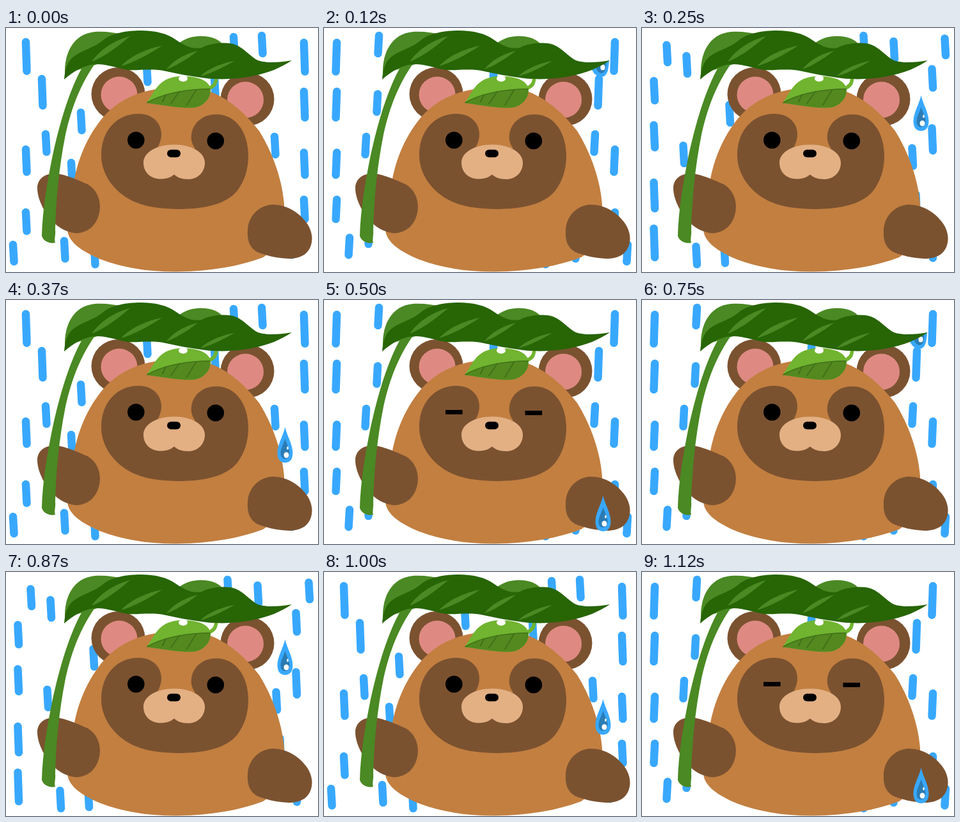
These frames come from a looping animation (488x384 px, 1.25 s). An HTML page with a canvas:

```html
<!DOCTYPE html>
<html lang="en">
<head>
<meta charset="utf-8">
<title>Tanuki in the rain</title>
<style>
html, body { margin: 0; width: 100%; height: 100%; overflow: hidden; background: #fff; }
canvas { display: block; }
</style>
</head>
<body>
<canvas id="stage" width="488" height="384"></canvas>
<script>
const ctx = document.getElementById('stage').getContext('2d');

const W = 486, H = 384, LOOP = 1250;

const BLUE = '#38a8ff', DEEP = '#2b7cb3', FUR = '#c27f40', DARK = '#7b5230',
  PINK = '#de8a82', CREAM = '#e3b084', STEM = '#4a8923', LEAF = '#276505',
  LIME = '#70b42f', MOSS = '#53891f', VEIN = '#41711a';

// Rain columns: x, then the top of each streak
const COLUMNS = [
  [11, 341], [31, 22, 191, 290], [56, 80], [62, 167], [91, 335], [102, 212],
  [117, 133], [138, 344], [220, 57], [326, 78], [348, 235], [356, 14], [400, 12],
  [402, 104], [415, 312], [420, 171], [446, 330], [466, 23, 100, 196, 270]
];

function fill(d, color) {
  ctx.fillStyle = color;
  ctx.fill(new Path2D(d));
}

function oval(x, y, rx, ry, color) {
  ctx.fillStyle = color;
  ctx.beginPath();
  ctx.ellipse(x, y, rx, ry, 0, 0, Math.PI * 2);
  ctx.fill();
}

function line(d, color, width) {
  ctx.strokeStyle = color;
  ctx.lineWidth = width;
  ctx.lineCap = 'round';
  ctx.stroke(new Path2D(d));
}

// One pattern serves all three phases: as is, mirrored, turned upside down
function rain(phase) {
  ctx.save();
  if (phase === 1) ctx.transform(-1, 0, 0, 1, W, 0);
  if (phase === 2) ctx.transform(-1, 0, 0, -1, W, H);
  for (const [x, ...tops] of COLUMNS) {
    for (const y of tops) {
      const edge = x < 60 || x > 440;
      const len = edge ? 47 - y * 0.06 : 28;
      line(`M${x} ${y}l1.5 ${len}`, BLUE, 12.5);
    }
  }
  ctx.restore();
}

function ear(x, y, px, py) {
  oval(x, y, 42, 42, DARK);
  oval(px, py, 28.5, 28.5, PINK);
}

function body() {
  ear(175.5, 104, 177, 105);
  ear(377.5, 112, 374.5, 113);
  fill('M268 94C220 94 182 107 153 139C126 171 112 208 106 243C103 270 98 300 96 318' +
    'C98 338 120 352 148 364C185 378 225 384 268 383.5C320 383 365 375 402 361' +
    'C424 348 436 310 435 277C432 238 417 196 396 162C374 134 348 110 314 98C299 95 284 94 268 94Z', FUR);
}

function eye(x, y, shut) {
  if (shut) {
    ctx.fillStyle = '#000';
    ctx.fillRect(x - 13.3, y - 3.5, 26.6, 7);
  } else {
    oval(x, y, 13.3, 13.3, '#000');
  }
}

function face(shut) {
  fill('M207 135C230 135 243 150 243 167C243 176 240 183 236 190L296 190' +
    'C291 183 289 176 290 168C292 149 308 136 329 136C361 136 379 166 379 201' +
    'C379 224 372 243 361 257C344 277 312 285 268 285C225 284 200 277 179 260' +
    'C158 242 149 220 149 200C149 162 173 135 207 135Z', DARK);
  fill('M263 183.5C291 183.5 311 196 311 212C311 228 299 238 285 238C275 238 267 235 263 230.5' +
    'C258 235 251 237.5 242 237.5C226 237.5 215 227 215 212C215 196 235 183.5 263 183.5Z', CREAM);
  line('M258 197.5h9', '#000', 12);
  eye(203.3, 176.5, shut);
  eye(327.8, 177.7, shut);
}

function hat() {
  line('M316 95C324 93 328 88 328.5 81', LIME, 5.5);
  fill('M220 118C229 105 234 91 249 82C262 75 280 74 297 78C311 81 318 87 320 96' +
    'C320 109 313 119 300 124C284 128 263 124 220 118Z', LIME);
  fill('M220 118C242 104 280 96 320 96C320 109 313 119 300 124C284 128 263 124 220 118Z', MOSS);
  line('M221 117.5C243 104 280 96 319 96', VEIN, 1.6);
  line('M250 105l-5 11M271 100l-13 19M297 98l-14 23', VEIN, 2);
  oval(277, 79.5, 7, 5, '#fff');
  oval(313, 80, 5, 3, '#fff');
}

function arms() {
  fill('M74 229C88 228 112 239 128 246C141 254 147 267 147 282C146 307 130 323 109 323' +
    'C93 321 79 313 67 298C56 283 48 264 49 249C51 236 61 230 74 229Z', DARK);
  fill('M415 278C437 277 457 289 469 305C477 315 480 328 478 338C475 353 464 363 442 363' +
    'C423 362 405 358 392 352C380 345 377 332 378 318C379 296 395 280 415 278Z', DARK);
}

// Pale slash on the big leaf, tapering at both ends
function slash(x, y, dx, dy) {
  const at = (u, v) => `${x + dx * u} ${y + dy * v}`;
  fill(`M${x} ${y}C${at(0.35, 0.12)} ${at(0.78, 0.5)} ${at(1, 1)}` +
    `C${at(0.72, 0.84)} ${at(0.36, 0.47)} ${x} ${y}Z`, STEM);
}

function umbrella() {
  fill('M124 54C103 87 86 140 73 200C63 249 57 290 56 327C58 335 67 340 77 338' +
    'C75 332 78 325 77 318C78 272 83 218 93 168C103 123 117 88 140 55Z', STEM);
  fill('M92 72C91 40 105 9 139 6C155 5 170 7 185 11L150 55Z', STEM);
  fill('M270 24C284 13 304 10 322 15C332 18 339 24 343 31L300 48Z', STEM);
  fill('M91 81C92 66 96 52 107 44C120 35 140 30 152 19C165 8 190 4 210 4' +
    'C235 4 252 9 265 18C281 29 292 34 306 31C320 24 342 21 358 26C372 31 382 45 394 51' +
    'C409 56 428 54 447 51C431 62 410 71 388 75C366 80 338 82 312 79C288 76 269 72 250 68' +
    'C230 63 210 67 191 66C173 63 157 56 139 57C119 59 105 69 91 81Z', LEAF);
  slash(194, 13, -60, 40);
  slash(244, 28, -64, 32);
  slash(300, 36, -49, 29);
  slash(357, 52, -53, 24);
}

function drop(y) {
  ctx.save();
  ctx.translate(436.5, y);
  fill('M0 -1C3 13 12 26 12 40C12 50 7 55 0 55C-7 55 -12 50 -12 40C-12 26 -3 13 0 -1Z', BLUE);
  fill('M0 17C2 25 7 32 7 40C7 46 4 49 0 49C-4 49 -7 46 -7 40C-7 32 -2 25 0 17Z', DEEP);
  oval(2, 43, 4, 4.5, '#fff');
  oval(4, 32, 1.4, 2.5, '#fff');
  ctx.restore();
}

// Drop swelling under the leaf tip
function bud() {
  fill('M446 51C445 64 444 77 433 77C425 76 420 70 417 60Z', BLUE);
  fill('M441 53C442 65 439 72 433 71C428 70 426 65 425 59Z', DEEP);
  oval(436, 62, 3.6, 4.5, '#fff');
}

function draw(step) {
  ctx.fillStyle = '#fff';
  ctx.fillRect(0, 0, 488, 384);
  rain(step % 3);
  body();
  face(step === 4);
  hat();
  arms();
  if (step === 1) bud();
  umbrella();
  // The drop falls with steady acceleration
  if (step > 1) drop(7 * step * step + 59 * step - 39);
}

const origin = performance.now();
let shown = -1;

function tick() {
  const t = (performance.now() - origin) % LOOP;
  // Steps of 125 ms, each starting on a whole 10 ms
  const step = (Math.ceil((Math.floor(t / 10) + 1) / 12.5) - 1) % 5;
  if (step !== shown) draw(shown = step);
  requestAnimationFrame(tick);
}
tick();
</script>
</body>
</html>
```
